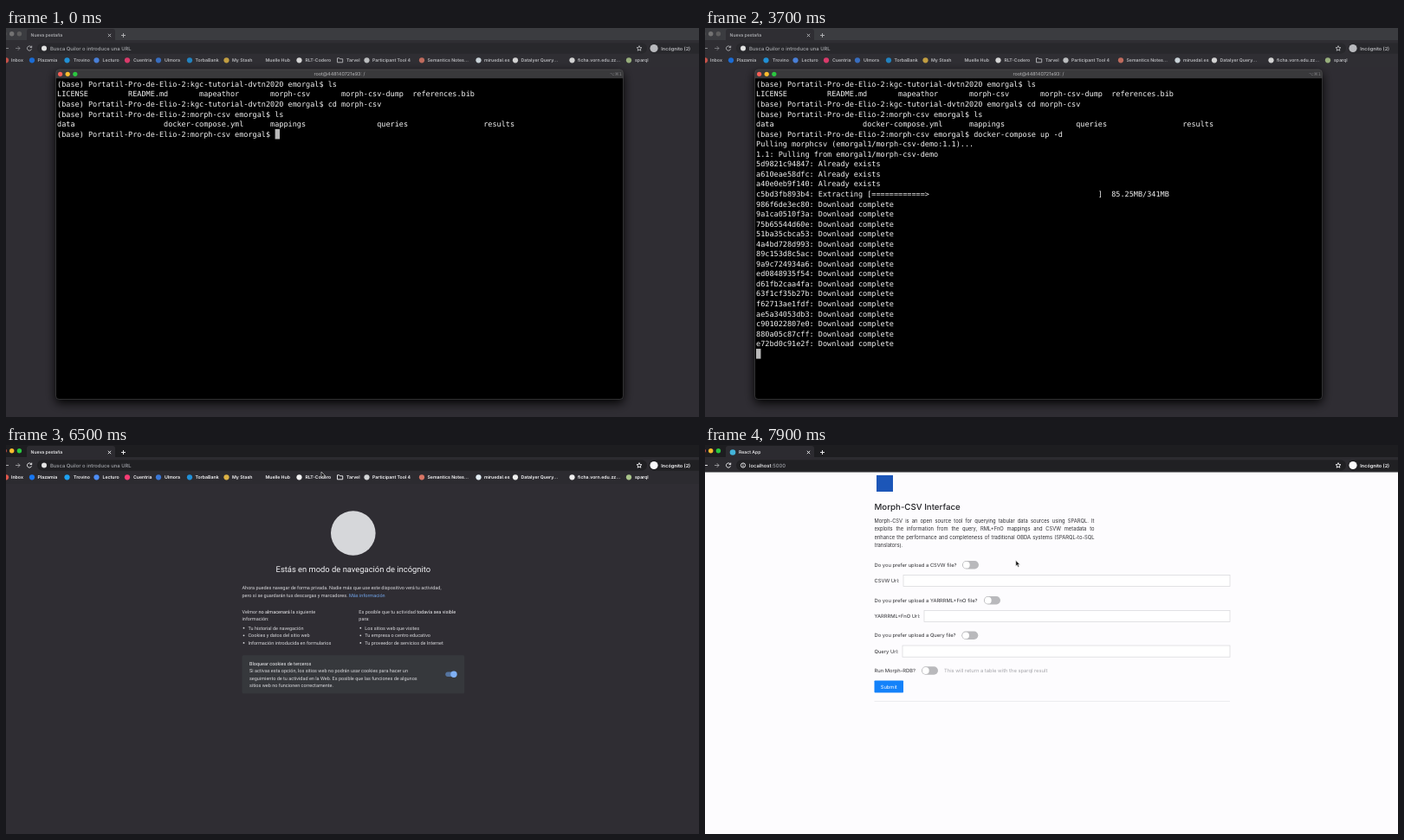
Write an HTML page that moves like this. It is 800 px wide and 450 px high and loops after 8 s.

```html
<!DOCTYPE html>
<html lang="es">
<head>
<meta charset="utf-8">
<title>Terminal and browser</title>
<style>
html, body { margin: 0; width: 100%; height: 100%; overflow: hidden; background: #2f2d33; }
svg { display: block; width: 100vw; height: 100vh; }
text { white-space: pre; text-rendering: geometricPrecision; }
.ui text, .form { font-family: Inter, Roboto, sans-serif; }
.ui { --strip: #1d1d20; --bar: #2c2b30; --field: #202023; --ink: #fafafc; --soft: #a0a3a9; }
.ui.idle { --strip: #3b3c40; --bar: #2f2e33; --field: #28282c; --ink: #b8b9bd; --soft: #a6a8ac; }
.ui.idle .mark { opacity: .85; }
.line { fill: none; stroke: var(--ink); stroke-width: .9; }
.ntp text { font-family: Roboto, sans-serif; font-size: 5.53px; fill: #d8d8dc; }
.ntp .hi { fill: #f2f2f5; }
.ntp .link { fill: #72a6ec; }
.form text, .form p { font-size: 5.8px; fill: #2e2e32; color: #2e2e32; }
.form p { margin: 0; line-height: 9.4px; white-space: nowrap; text-align-last: justify; }
.form p:last-child { text-align-last: left; }
.term text { font: 8.53px "DejaVu Sans Mono", monospace; fill: #f4f4f4; }
.term .ok { fill: #27cc2b; }
.term .title { font: 5.5px Inter, sans-serif; fill: #b9b9bb; }
.term .keys { font: 5px "DejaVu Sans", sans-serif; fill: #7c7c7f; }
</style>
</head>
<body>
<svg id="stage" viewBox="0 0 800 450" preserveAspectRatio="none"></svg>
<script>
const text = (x, y, body, attrs = '') => `<text x="${x}" y="${y}" ${attrs}>${body}</text>`;
const rect = (x, y, w, h, fill, attrs = '') =>
  `<rect x="${x}" y="${y}" width="${w}" height="${h}" fill="${fill}" ${attrs}/>`;
const dot = (x, y, r, fill, attrs = '') => `<circle cx="${x}" cy="${y}" r="${r}" fill="${fill}" ${attrs}/>`;
const path = (d, attrs = 'class="line"') => `<path d="${d}" ${attrs}/>`;
const group = (id, cls, body) => `<g id="${id}" class="${cls}">${body}</g>`;

// Bookmarks: icon x, label x, icon colour, label
const bookmarks = [
  [0, 6, '#e2574c', 'Inbox'], [30, 36.5, '#1877f2', 'Plazamia'], [70.5, 78, '#1da1f2', 'Trovino'],
  [104.5, 111.5, '#4d8df6', 'Lecturo'], [140, 147, '#f83c74', 'Cuentria'], [176, 183, '#3a78d8', 'Ulmora'],
  [212, 218.5, '#2090d8', 'TorbaBank'], [254.5, 261, '#dcb244', 'My Stash'], [293, 299.5, 'none', 'Muelle Hub'],
  [338.5, 345.5, '#f2f2f2', 'RLT-Codero'], [385.5, 393, 'folder', 'Tarvel'],
  [416.5, 423, '#d4d6d8', 'Participant Tool 4'], [480, 486.5, '#d87565', 'Semantics Notes...'],
  [545.5, 552, '#e4eef6', 'miruedal.es'], [588, 594.5, '#eeeeee', 'Datalyer Query...'],
  [653.5, 660, '#eeeeee', 'ficha.vorn.edu.zz...'], [719, 726, '#a9c48a', 'sparql']
];
const bookmark = ([ix, tx, color, label]) =>
  (color === 'folder'
    ? path(`M${ix - 3} 34.8h2.3l.9 1h3v4h-6.2z`)
    : dot(ix, 37.3, 3.1, color, 'class="mark"')) +
  text(tx, 39.1, label, 'font-size="5.2" font-weight="600" fill="var(--ink)"');

function newTabPage() {
  const left = ['Tu historial de navegación', 'Cookies y datos del sitio web', 'Información introducida en formularios'];
  const right = ['Los sitios web que visites', 'Tu empresa o centro educativo', 'Tu proveedor de servicios de Internet'];
  const bullets = (x, items) => items.map((s, i) =>
    dot(x + 2, 211.7 + i * 8.6, .9, '#d8d8dc') + text(x + 7, 213.6 + i * 8.6, s)).join('');
  const notice = ['Si activas esta opción, los sitios web no podrán usar cookies para hacer un',
    'seguimiento de tu actividad en la Web. Es posible que las funciones de algunos',
    'sitios web no funcionen correctamente.'];
  return dot(400.8, 102, 25.8, '#d6d7da') +
    text(400.8, 147.3, 'Estás en modo de navegación de incógnito', 'class="hi" text-anchor="middle" style="font-size:9.4px"') +
    text(272.5, 167.4, 'Ahora puedes navegar de forma privada. Nadie más que use este dispositivo verá tu actividad,') +
    text(272.5, 175.8, 'pero sí se guardarán tus descargas y marcadores. <tspan class="link">Más información</tspan>') +
    text(272.5, 194.5, 'Velmor <tspan class="hi">no almacenará</tspan> la siguiente') + text(272.5, 203, 'información:') +
    text(407.3, 194.5, 'Es posible que tu actividad <tspan class="hi">todavía sea visible</tspan>') + text(407.3, 203, 'para:') +
    bullets(272.5, left) + bullets(407.3, right) +
    rect(272.5, 243.3, 256.7, 44.2, '#36383c', 'rx="1.5"') +
    text(281, 254.5, 'Bloquear cookies de terceros', 'class="hi"') +
    notice.map((s, i) => text(281, 263.1 + i * 8.55, s)).join('') +
    rect(507.3, 262.6, 12.5, 5.4, '#55749f', 'rx="2.7"') + dot(517, 265.3, 3.7, '#7fb0f5');
}

function formPage() {
  const toggle = (x, y) => rect(x, y - 4.7, 19, 9.4, '#b9b9bc', 'rx="4.7"') + dot(x + 4.8, y, 3.9, '#fff');
  const field = (y, label, x) => text(195.5, y + 2, label) +
    rect(x, y - 6.6, 606 - x, 13.2, '#fff', 'stroke="#d6d6da" stroke-width=".7"');
  const question = (y, label, x) => text(195.5, y + 1.8, label) + toggle(x, y);
  const intro = ['Morph-CSV is an open source tool for querying tabular data sources using SPARQL. It',
    'exploits the information from the query, RML+FnO mappings and CSVW metadata to',
    'enhance the performance and completeness of traditional OBDA systems (SPARQL-to-SQL',
    'translators).'];
  return rect(198, 35, 19, 19, '#1c56b8') +
    text(195.5, 74.8, 'Morph-CSV Interface', 'font-weight="500" style="font-size:9.7px;fill:#222226"') +
    `<foreignObject x="195.5" y="83" width="254" height="40">${intro.map(s => `<p xmlns="http://www.w3.org/1999/xhtml">${s}</p>`).join('')}</foreignObject>` +
    question(138.7, 'Do you prefer upload a CSVW file?', 297) + field(157, 'CSVW Url:', 229) +
    question(179.7, 'Do you prefer upload a YARRRML+FnO file?', 322) + field(198, 'YARRRML+FnO Url:', 253) +
    question(220.3, 'Do you prefer upload a Query file?', 296.3) + field(238.6, 'Query Url:', 228) +
    question(261, 'Run Morph-RDB?', 250) +
    text(276, 262.8, 'This will return a table with the sparql result', 'style="fill:#a5a5aa"') +
    rect(195.5, 272.5, 33.5, 14, '#1482fa', 'rx=".8"') +
    text(212.2, 281.5, 'Submit', 'text-anchor="middle" style="fill:#fff"');
}

const browserBar =
  rect(0, 0, 800, 15, 'var(--strip)') + rect(0, 14, 800, 17.3, 'var(--bar)') +
  path('M24 14.5V4q0-3 3-3h96q3 0 3 3v10.5z', 'fill="var(--bar)"') +
  group('lights', '', ['#f95f57', '#fbbd2e', '#2bc840'].map((c, i) => dot(-2 + i * 8.7, 6.7, 2.7, c)).join('')) +
  text(28.5, 10.4, '', 'id="tab" font-size="5.15" font-weight="500" fill="var(--ink)"') +
  path('M31 5.2a3 3 0 0 1 3 3', 'class="line" id="spinner"') + dot(32, 8.5, 3.3, '#43b4da', 'id="favicon"') +
  path('M117.8 6.8l3.4 3.4m0-3.4l-3.4 3.4M133 8.5h5m-2.5-2.5v5') +
  path('M-3 23.5h6', 'class="line" id="back"') +
  path('M11 23.5h5m-2.3-2.4l2.3 2.4l-2.3 2.4', 'class="line" opacity=".55"') +
  path('M29.3 22.2a2.6 2.6 0 1 0 .2 2.2M29.7 20.6v2h-2', 'class="line" id="reload"') +
  path('M24.7 21.2l4.6 4.6m0-4.6l-4.6 4.6', 'class="line" id="stop"') +
  rect(36, 17.3, 704, 12.4, 'var(--field)', 'rx="6.2"') +
  dot(44, 23.5, 3, '#e3e3e3', 'id="engine"') +
  group('info', '', '<circle class="line" cx="44" cy="23.5" r="2.6" stroke-width=".7"/>' + path('M44 23.2v1.7M44 21.8v.7')) +
  text(51, 25.6, '', 'id="address" font-size="5.85" font-weight="500" fill="var(--ink)"') +
  path('M731 20.6l.8 2 2.1.1-1.6 1.4.5 2.1-1.8-1.1-1.8 1.1.5-2.1-1.6-1.4 2.1-.1z', 'class="line" stroke-width=".6"') +
  rect(742, 17.3, 70, 12.4, 'var(--field)', 'rx="6.2"') + dot(748, 23.5, 4.6, 'var(--ink)') +
  text(756.3, 25.5, 'Incógnito (2)', 'font-size="5.5" font-weight="600" fill="var(--ink)"');

const TOP = 59.2, LEFT = 59, PITCH = 11.55, ADVANCE = 5.135, ROWS = 32;
const terminal =
  rect(57.5, 48, 655, 381.5, '#000', 'rx="4" filter="url(#shadow)"') +
  rect(57.5, 48, 655, 381.5, '#000', 'rx="4"') +
  path('M57.5 58.3V52q0-4 4-4h647q4 0 4 4v6.3z', 'fill="#39393b"') +
  rect(57.5, 48, 655, 381.5, 'none', 'rx="4" stroke="#58585b" stroke-width=".5"') +
  ['#f95f57', '#fbbd2e', '#2bc840'].map((c, i) => dot(62.6 + i * 8.6, 53.3, 2.6, c)).join('') +
  text(385, 55.2, 'root@448140721e93: /', 'class="title" text-anchor="middle"') +
  text(711, 55.2, '⌥⌘1', 'class="keys" text-anchor="end"') +
  rect(0, 0, ADVANCE + .3, PITCH, '#b9b9b9', 'id="caret"') +
  Array.from({ length: ROWS }, (_, r) => text(LEFT, TOP + 8.7 + r * PITCH, '', 'class="row"')).join('');

const $ = id => document.getElementById(id);
$('stage').innerHTML =
  '<defs><filter id="shadow" x="-10%" y="-10%" width="120%" height="125%"><feOffset dy="4"/><feGaussianBlur stdDeviation="6"/></filter></defs>' +
  rect(0, 0, 800, 450, '#2f2d33') +
  group('ntp', 'ntp', newTabPage()) +
  group('browser', 'ui', rect(0, 31, 800, 14, 'var(--bar)') + bookmarks.map(bookmark).join('') +
    group('site', '', rect(0, 31.3, 800, 419, '#fdfcfe') + rect(195.5, 296.2, 410.5, .7, '#e6e6ea')) +
    group('form', 'form', formPage()) + browserBar) +
  group('terminal', 'term', terminal) +
  group('pointer', '',
    path('M0 0v6.6l1.5-1.4 1.1 2.5 1.2-.5-1.1-2.5h2z', 'id="arrow" fill="#111" stroke="#eee" stroke-width=".6"') +
    path('M-1.6-3.6q1.6 0 1.6 1v5.2q0 1-1.6 1M1.6-3.6q-1.6 0-1.6 1M1.6 3.6q-1.6 0-1.6-1M-1 1h2', 'id="beam" fill="none" stroke="#f2f2f2" stroke-width=".8"'));
const rows = [...document.querySelectorAll('.row')];

// Terminal session
const prompt = (dir, cmd = '') => `(base) Portatil-Pro-de-Elio-2:${dir} emorgal$ ${cmd}`;
const list = (width, names) => names.split(' ').map(s => s.padEnd(width)).join('');
const intro = [
  prompt('kgc-tutorial-dvtn2020', 'ls'),
  list(16, 'LICENSE README.md mapeathor morph-csv morph-csv-dump references.bib'),
  prompt('kgc-tutorial-dvtn2020', 'cd morph-csv'),
  prompt('morph-csv', 'ls'),
  list(24, 'data docker-compose.yml mappings queries results')
];
const layers = ('5d9821c94847 a610eae58dfc a40e0eb9f140 c5bd3fb893b4 986f6de3ec80 9a1ca0510f3a 75b65544d60e ' +
  '51ba35cbca53 4a4bd728d993 89c153d8c5ac 9a9c724934a6 ed0848935f54 d61fb2caa4fa 63f1cf35b27b ' +
  'f62713ae1fdf ae5a34053db3 c901022807e0 880a05c87cff e72bd0c91e2f').split(' ');
const tableRow = (...cells) => {
  const widths = [20, 30, 25, 20, 20, 25];
  const line = cells.map((c, i) => c.padEnd(widths[i] || 0)).join('');
  return [line.slice(0, 127), line.slice(127)];
};
const containers = [
  ...tableRow('CONTAINER ID', 'IMAGE', 'COMMAND', 'CREATED', 'STATUS', 'PORTS', 'NAMES'),
  ...tableRow('5f4ab0a28ebd', 'emorgal1/morph-csv-demo:1.1', '"python3 /server/app…"', '4 seconds ago', 'Up 3 seconds', '0.0.0.0:5000->5000/tcp', 'morphcsv'),
  ...tableRow('cd6340db1af5', 'postgres', '"docker-entrypoint.s…"', '8 seconds ago', 'Up 3 seconds', '5432/tcp', 'postgres')
];
const clamp = v => Math.min(1, Math.max(0, v));
const typed = (s, t, from, to) => s.slice(0, Math.ceil(s.length * clamp((t - from) / (to - from))));

function progress(word, done) {
  const n = Math.floor(done * 50), size = parseFloat((done * 341).toPrecision(4)) + 'MB';
  return `${word} [${'='.repeat(n)}>${' '.repeat(50 - n)}] ${size.padStart(8)}/341MB`;
}
function layerStatus(i, t) {
  if (i < 3) return 'Already exists';
  if (t >= 4000 + (i - 3) * 25) return 'Pull complete';
  if (t < 2300) return i < 9 ? 'Pulling fs layer' : 'Waiting';
  if (i === 3) return t < 3650
    ? progress('Downloading', clamp((t - 2350) * 64.89 / 250 / 341))
    : progress('Extracting', clamp((t - 3600) / 400));
  const ready = i < 9 ? 2400 + (i - 4) * 40 : 2700 + (i - 9) * 90;
  return t < ready ? 'Waiting' : 'Download complete';
}
function session(t) {
  const out = [...intro, prompt('morph-csv', typed('docker-compose up -d', t, 400, 1200))];
  if (t < 1300) return out;
  if (t >= 1500) out.push('Pulling morphcsv (emorgal1/morph-csv-demo:1.1)...');
  if (t >= 2200) out.push('1.1: Pulling from emorgal1/morph-csv-demo', ...layers.map((id, i) => `${id}: ${layerStatus(i, t)}`));
  if (t >= 4400) out.push('Digest: sha256:48385f50e603aba00930dc2254679e34ac1291f9e693d98331af4290d40ac41d',
    'Status: Downloaded newer image for emorgal1/morph-csv-demo:1.1');
  if (t >= 4500) out.push('Creating postgres ... ' + (t >= 4700 ? 'done' : ''));
  if (t >= 4700) out.push('Creating morphcsv ... ' + (t >= 4900 ? 'done' : ''));
  if (t < 4900) return [...out, ''];
  out.push(prompt('morph-csv', typed('docker ps', t, 4900, 5400)));
  if (t >= 5500) out.push(...containers, prompt('morph-csv'));
  return out;
}

// Pointer path: time, x, y
const stops = [[5800, 402, 152], [6200, 364, 31], [6600, 364, 31], [6800, 318, 22.5], [7500, 318, 22.5], [7800, 358.8, 133.5], [8000, 358.8, 133.5]];
function pointerAt(t) {
  const i = stops.findIndex((s, k) => k && t <= s[0]);
  const [a, b] = [stops[i - 1], stops[i]];
  const u = clamp((t - a[0]) / (b[0] - a[0])), k = u * u * (3 - 2 * u);
  return [a[1] + (b[1] - a[1]) * k, a[2] + (b[2] - a[2]) * k];
}

const show = (id, on) => { $(id).style.display = on ? '' : 'none'; };
const setBody = (el, body) => { if (el.body !== body) el.innerHTML = el.body = body; };

function render(t) {
  const front = t >= 6200, loading = t >= 7200 && t < 7500, loaded = t >= 7500, ready = t >= 7600;
  show('terminal', !front);
  if (!front) {
    const lines = session(t).slice(-ROWS);
    rows.forEach((el, r) => setBody(el, (lines[r] || '').replace(/done$/, '<tspan class="ok">done</tspan>')));
    const last = lines.length - 1;
    $('caret').setAttribute('x', LEFT + lines[last].length * ADVANCE);
    $('caret').setAttribute('y', TOP + last * PITCH);
  }
  $('browser').classList.toggle('idle', !front);
  $('lights').style.filter = front ? '' : 'grayscale(1) brightness(.6)';
  show('ntp', !loaded);
  show('site', loaded);
  show('form', ready);
  show('favicon', ready);
  show('spinner', t >= 7200 && !ready);
  $('spinner').setAttribute('transform', `rotate(${(t - 7400) * .6 - 90} 31 8.2)`);
  show('stop', loading);
  show('reload', !loading);
  $('back').setAttribute('opacity', loaded ? 1 : .7);

  setBody($('tab'), ready ? 'React App' : 'Nueva pestaña');
  $('tab').setAttribute('x', t >= 7200 ? 39 : 28.5);
  const url = typed('localhost:5000', t, 6800, 7100);
  show('engine', !url);
  show('info', url);
  setBody($('address'), t >= 7200 ? 'localhost<tspan fill="var(--soft)">:5000</tspan>'
    : url || '<tspan fill="var(--soft)">Busca Quilor o introduce una URL</tspan>');

  show('pointer', t >= 5800);
  if (t >= 5800) {
    const [x, y] = pointerAt(t), overField = y < 29 && front;
    $('pointer').setAttribute('transform', `translate(${x} ${y})`);
    show('beam', overField);
    show('arrow', !overField);
  }
}

const LOOP = 8000, STEP = 100, start = performance.now();
function tick() {
  const t = (performance.now() - start) % LOOP;
  render(Math.floor(t / STEP) * STEP);
  requestAnimationFrame(tick);
}
tick();
</script>
</body>
</html>
```
